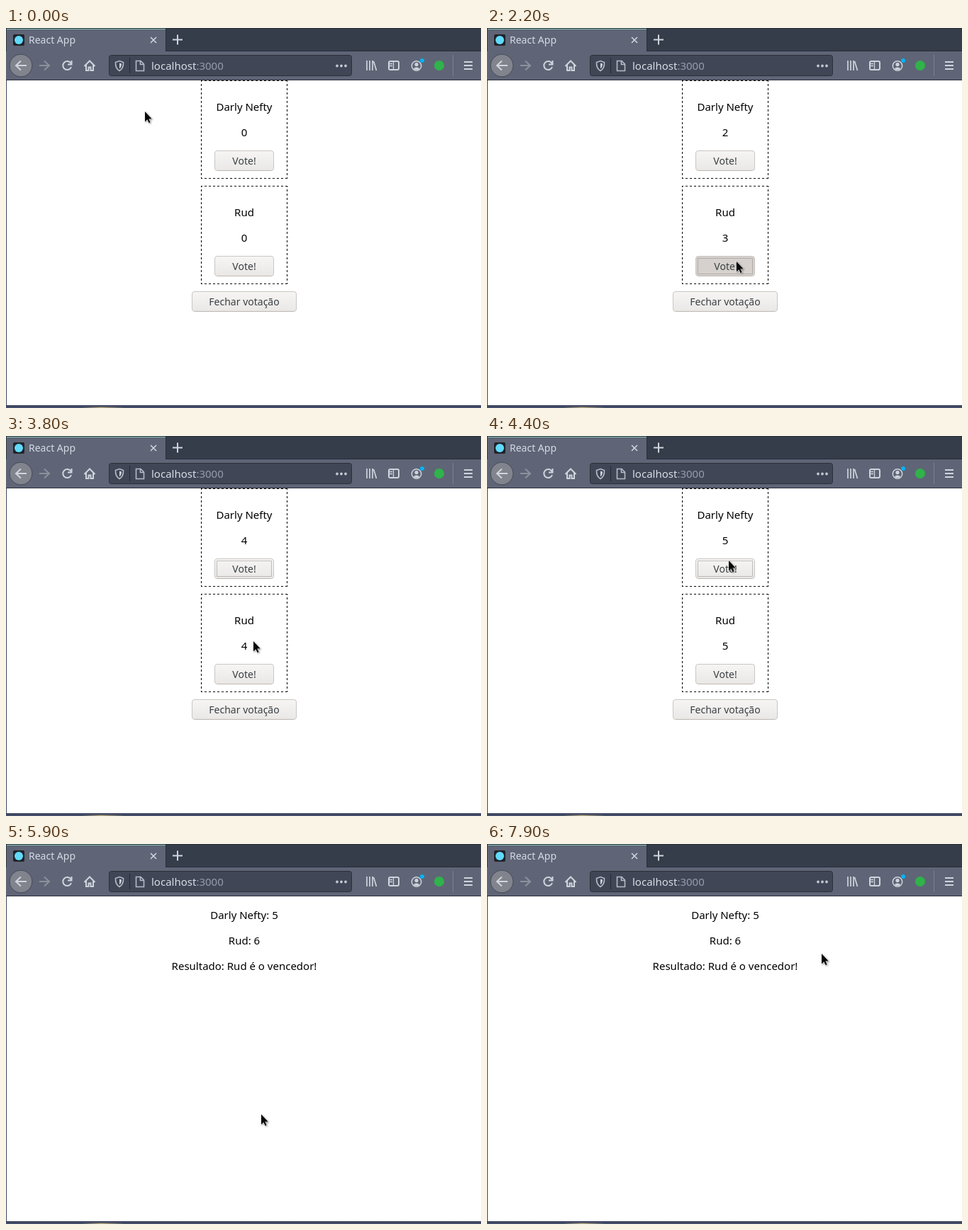
Write an HTML page that moves like this. It is 670 by 537 pixels and loops after 8 s.

```html
<!DOCTYPE html>
<html lang="pt">
<head>
<meta charset="utf-8">
<title>React App</title>
<style>
  html, body { margin: 0; width: 100%; height: 100%; overflow: hidden; background: #fff; }
  svg { display: block; width: 100vw; height: 100vh; }
  text { font: 15px "Noto Sans", "Open Sans", sans-serif; }
  .page text { text-anchor: middle; }
  .button text { font-size: 14px; fill: #3a3f42; }
  .face { fill: url(#buttonFill); stroke: #cbc5c0; }
  .ring { fill: none; stroke: #8b8986; stroke-dasharray: 1 1; visibility: hidden; }
  .focused .ring { visibility: visible; }
  .pressed .face { fill: #d6d1cd; }
  .pressed text { transform: translateX(1px); }
  .card { fill: none; stroke: #000; stroke-dasharray: 3; stroke-dashoffset: 1; }
  .icon { fill: none; stroke: #d0d4dd; stroke-width: 2; }
  .thin { stroke: #b6bbc8; stroke-width: 1.6; }
  .solid { fill: #d0d4dd; stroke: none; }
  #cursor { filter: drop-shadow(1px 1px 1px #0006); }
</style>
</head>
<body>
<svg viewBox="0 0 670 537">
  <defs>
    <linearGradient id="buttonFill" x2="0" y2="1">
      <stop stop-color="#f6f5f4"/><stop offset="1" stop-color="#eae8e6"/>
    </linearGradient>
    <linearGradient id="desktop">
      <stop offset=".16" stop-color="#46506a"/>
      <stop offset=".2" stop-color="#b3a67e"/>
      <stop offset=".25" stop-color="#46506a"/>
    </linearGradient>
  </defs>

  <!-- Window frame, tab and toolbar -->
  <rect width="670" height="537" fill="#3d4560"/>
  <rect width="670" height="33" fill="#363d4a"/>
  <rect y="33" width="670" height="40" fill="#5f6576"/>
  <rect x="1" width="224" height="33" fill="#5f6576"/>
  <path d="M0 .5H670M225.5 0V33M226 32.5H670M0 73.5H670" stroke="#282d39"/>
  <path d="M1 1.5H225" stroke="#8bc5bb"/>
  <rect x="10" y="9" width="16" height="16" rx="2" fill="#20232a"/>
  <circle cx="18" cy="17" r="6" fill="#61dafb"/>
  <text x="32" y="22" style="font-size:14px" fill="#d6dae3">React App</text>
  <g class="icon">
    <path d="M204 13l8 8m0-8l-8 8" stroke-width="1.6"/>
    <path d="M235 16.5h14m-7-7v14"/>
    <circle cx="21" cy="53" r="16" fill="#81848d" stroke="#454a59" stroke-width="1"/>
    <path d="M29 53H14m7-6.5L14 53l7 6.5"/>
    <path d="M47 53h14m-7-6.500l7 6.500l-7 6.500" opacity=".4"/>
    <path d="M91.500 50A6 6 0 1 0 92 55m.5-9v5.500H87"/>
    <path d="M110.500 54l7.500-7.500l7.500 7.500M113 52v8h3.500v-4.500h3V60h3.500v-8"/>
  </g>

  <!-- Address bar -->
  <rect x="145.500" y="38.500" width="342" height="29" rx="3" fill="#404655" stroke="#2a2f3b"/>
  <path d="M174.500 42v22" stroke="#262b36"/>
  <g class="icon thin">
    <path d="M160 46.500l5.500 2Q166 57 160 60.500Q154 57 154.500 48.500Z"/>
    <path d="M160 49.500v8q3-2.500 3-7Z" class="solid"/>
    <path d="M183.500 46.500h6.500l4.500 4.500v9.500h-11Zm6 0v5h5"/>
  </g>
  <text x="205" y="59" fill="#d9dde6">localhost<tspan fill="#969cab">:3000</tspan></text>
  <path d="M467 53.500h13" stroke="#c3c8d3" stroke-width="3.800" stroke-linecap="round" stroke-dasharray="0 6"/>

  <!-- Toolbar buttons -->
  <g class="icon">
    <path d="M509 46v14m4-14v14m4-14v14m1.500-13l4 13" stroke-width="1.700"/>
    <rect x="540" y="47" width="14" height="12" rx="2"/>
    <path d="M546.500 47v12m-5.500-8.500h4m-4 3h4" stroke-width="1.300"/>
    <circle cx="579" cy="53.500" r="6.700" stroke-width="1.500"/>
    <circle cx="579" cy="51.500" r="2.600" class="solid"/>
    <path d="M574.500 57.500q4.500-4 9 0q-4.500 3.500-9 0Z" class="solid"/>
    <path d="M646 48h12m-12 5h12m-12 5h12"/>
  </g>
  <circle cx="587" cy="46" r="3" fill="#00b3f4"/>
  <circle cx="611" cy="53" r="7" fill="#2fb34a"/>
  <path d="M630.500 38v30" stroke="#7b8191"/>

  <!-- Page -->
  <rect x="1" y="74" width="669" height="459" fill="#fff"/>
  <rect y="535.500" width="670" height="1.500" fill="url(#desktop)"/>
  <g class="page" id="voting"></g>
  <g class="page" id="result"></g>
  <path id="cursor" d="M0 0v14.500l3.300-3.200l2.300 5l2-1l-2.200-4.800h4.400Z" fill="#080808" stroke="#fff" paint-order="stroke"/>
</svg>
<script>
const LOOP = 8000, STEP = 100;
const candidates = ["Darly Nefty", "Rud"];
const CLOSE = 2;

// Where the mouse goes; a spot on a button carries that button's index.
const START = { x: 196, y: 118 };
const FIRST = { x: 341, y: 176, button: 0 };
const SECOND = { x: 352, y: 330, button: 1 };
const FINISH = { x: 360, y: 382, button: CLOSE };
const BELOW_FIRST = { x: 350, y: 201 };
const LEFT = { x: 296, y: 166 }, RIGHT = { x: 467, y: 166 }, EXIT = { x: 472, y: 155 };

// Each visit in steps: when the mouse sets off, when it arrives, when it presses.
const visits = [
  { spot: START, leave: 0, arrive: 0 },
  { spot: FIRST, leave: 1, arrive: 5, presses: [6, 8] },
  { spot: SECOND, leave: 9, arrive: 13, presses: [14, 16, 19, 22] },
  { spot: BELOW_FIRST, leave: 24, arrive: 28 },
  { spot: FIRST, leave: 30, arrive: 31, presses: [32, 36] },
  { spot: SECOND, leave: 37, arrive: 38.5, presses: [40] },
  { spot: FIRST, leave: 41, arrive: 43, presses: [43] },
  { spot: SECOND, leave: 44, arrive: 47, presses: [50] },
  { spot: FINISH, leave: 51, arrive: 56, presses: [58] },
  { spot: LEFT, leave: 60, arrive: 69 },
  { spot: RIGHT, leave: 69, arrive: 74 },
  { spot: LEFT, leave: 74, arrive: 77 },
  { spot: EXIT, leave: 78, arrive: 79 }
];
const clicks = visits.flatMap(({ spot, presses = [] }) =>
  presses.map(down => ({ down, up: down + 1, button: spot.button })));
const closedAt = clicks.find(click => click.button === CLOSE).up;

const byId = id => document.getElementById(id);
const label = (y, text, attrs = "") => `<text x="336" y="${y}" ${attrs}>${text}</text>`;
const button = (y, width, text) => {
  const x = 336 - width / 2;
  return `<g class="button">
    <rect class="face" x="${x + .5}" y="${y + .5}" width="${width - 1}" height="28" rx="3.5"/>
    <path d="M${x + 4} ${y + 28.5}h${width - 8}" stroke="#bdb6af"/>
    <rect class="ring" x="${x + 3.5}" y="${y + 3.5}" width="${width - 7}" height="22"/>
    ${label(y + 20, text)}</g>`;
};
const card = (name, i) => {
  const y = 74 + 149 * i;
  return `<path class="card" d="M275 ${y + .5}h122m-122 138h122M275.5 ${y}v139m121-139v139"/>`
    + label(y + 43, name) + label(y + 79, "0", 'class="count"')
    + button(y + 99, 84, "Vote!");
};

const voting = byId("voting"), result = byId("result"), cursor = byId("cursor");
voting.innerHTML = candidates.map(card).join("") + button(372, 148, "Fechar votação");
const buttons = voting.querySelectorAll(".button");
const counts = voting.querySelectorAll(".count");

const votes = (i, step) => clicks.filter(click => click.button === i && click.up <= step).length;
const totals = candidates.map((_, i) => votes(i, closedAt));
const winner = candidates[totals[0] > totals[1] ? 0 : 1];
result.innerHTML = candidates.map((name, i) => label(106 + 36 * i, `${name}: ${totals[i]}`)).join("")
  + label(178, `Resultado: ${winner} é o vencedor!`);

const smooth = k => k * k * (3 - 2 * k);

function mouseAt(step) {
  const i = visits.findLastIndex(visit => visit.leave <= step);
  const { spot: to, leave, arrive } = visits[i];
  const from = visits[Math.max(i - 1, 0)].spot;
  const k = step < arrive ? smooth((step - leave) / (arrive - leave)) : 1;
  return ["x", "y"].map(axis => Math.round(from[axis] + (to[axis] - from[axis]) * k));
}

function draw(now) {
  const step = Math.floor((now % LOOP) / STEP);
  const closed = step >= closedAt;
  voting.style.display = closed ? "none" : "";
  result.style.display = closed ? "" : "none";
  counts.forEach((count, i) => count.textContent = votes(i, step));

  const last = clicks.findLast(click => click.down <= step);
  buttons.forEach((el, i) => {
    const focused = last?.button === i;
    el.classList.toggle("focused", focused);
    el.classList.toggle("pressed", focused && step < last.up);
  });
  cursor.setAttribute("transform", `translate(${mouseAt(step)})`);
}

const start = performance.now();
function tick() {
  draw(performance.now() - start);
  requestAnimationFrame(tick);
}
tick();
</script>
</body>
</html>
```
